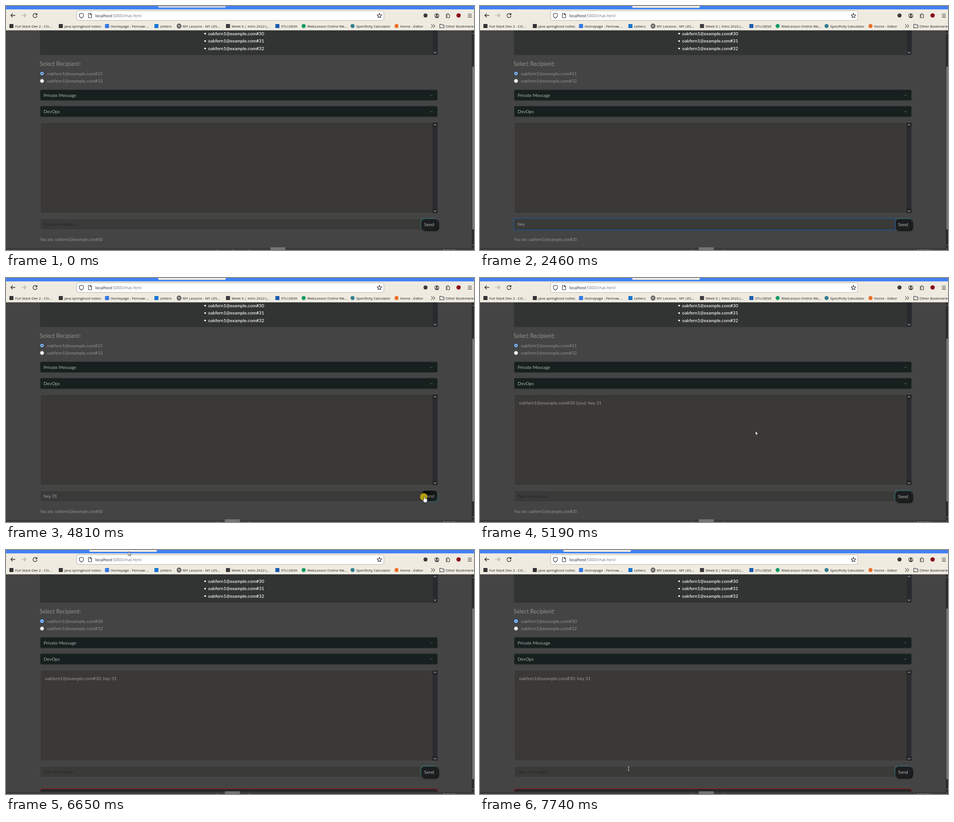
Write an HTML page that moves like this. It is 1033 px wide and 542 px high and loops after 8 s.

```html
<!DOCTYPE html>
<html lang="en">
<head>
<meta charset="utf-8">
<title>Chat demo</title>
<style>
  html, body { margin: 0; width: 100%; height: 100%; overflow: hidden; background: #444; }
  svg { display: block; width: 100vw; height: 100vh; }
  text { white-space: pre; }
  .ui { font: 7.9px "Open Sans", "Noto Sans", sans-serif; fill: #1c1b20; }
  .url { font-size: 8.85px; }
  .page { font: 10.05px Lato, "Open Sans", sans-serif; fill: #909090; }
  .line { fill: none; stroke: #2c2b30; stroke-width: 1.1; stroke-linecap: round; stroke-linejoin: round; }
  .send { filter: drop-shadow(-1px -1px .8px #3a858c) drop-shadow(2px 2px 1.2px #080808); }
  .pressed { filter: drop-shadow(1px 1px .8px #23727a); }
</style>
</head>
<body>
<svg viewBox="0 0 1033 542" preserveAspectRatio="none">
  <defs>
    <linearGradient id="inset" x2="1" y2="1">
      <stop offset="0" stop-color="#060606"/>
      <stop offset=".5" stop-color="#151616"/>
      <stop offset="1" stop-color="#222626"/>
    </linearGradient>
  </defs>
  <rect width="1033" height="542" fill="#444"/>

  <g class="page">
    <g id="content">
      <path d="M75 30H953V105a4 4 0 0 1-4 4H79a4 4 0 0 1-4-4z" fill="#323433"/>
      <path d="M942 30H953V105a4 4 0 0 1-4 4H942z" fill="#282a2d"/>
      <g id="members"></g>
      <text x="74" y="132.5" font-size="12.6">Select Recipient:</text>
      <g id="recipients"></g>
      <g id="selects"></g>
      <rect x="75.5" y="258.5" width="877" height="202" rx="5" fill="#3a3937" stroke="#4d4d4d"/>
      <rect x="941.5" y="259" width="11" height="201" fill="#2b2c2f"/>
      <path d="M941.5 259h11v10h-11zM941.5 450h11v10h-11z" fill="#242528"/>
      <g id="chevrons"></g>
      <text id="message" x="86" y="281.3" fill="#999"></text>

      <rect x="75.5" y="472.5" width="850" height="24.5" rx="4" fill="#3a3a39" stroke="#4a4a4a"/>
      <g id="sendUp">
        <rect class="send" x="916.5" y="473" width="37" height="24.5" rx="7" fill="#1c1d1e"/>
        <text x="923" y="488.5" fill="#b4b4b4">Send</text>
      </g>
      <g id="sendDown">
        <rect class="pressed" x="919" y="472.5" width="33" height="23.5" rx="6" fill="url(#inset)"/>
        <text x="926" y="488" font-size="8.8" fill="#9a9a9a">Send</text>
      </g>
      <g id="focus">
        <rect x="74.5" y="471.5" width="842.5" height="26.5" rx="3.5" fill="none" stroke="#2a4d78" stroke-width="2"/>
        <rect x="75.5" y="472.5" width="840.5" height="24.5" rx="3" fill="#3a3a39" stroke="#2b4a70" stroke-width=".8"/>
      </g>
      <text id="draft" x="83" y="488.3"></text>
      <rect id="caret" y="479" width="1" height="12" fill="#a5a5a5"/>
      <text id="identity" x="75" y="521.5" font-size="8.66" fill="#929292"></text>
    </g>
    <path id="alert" d="M75 542V535a5 5 0 0 1 5-5H948a5 5 0 0 1 5 5V542" fill="#272727" stroke="#8f2529" stroke-width="1.3"/>
  </g>

  <rect x="1028" y="54" width="5" height="483" fill="#2c2c2e"/>
  <rect id="thumb" x="1029" width="4" fill="#747476"/>
  <path d="M1029.5 62l2-2 2 2M1029.5 530l2 2 2-2" fill="none" stroke="#999"/>

  <rect y="537" width="1033" height="5" fill="#393a3a"/>
  <rect id="task" y="536" width="33" height="6" fill="#747474"/>
  <path d="M464 541.5h4M499 541.5h4M535 541.5h4" stroke="#888" stroke-width=".8"/>
  <text class="ui" x="965" y="546" style="fill:#eee">7:22 PM</text>

  <rect width="1033" height="8" fill="#4081f4"/>
  <rect id="tab" y="-4" width="149" height="8" rx="2"/>
  <rect y="7.5" width="1033" height="46.5" fill="#f0ebe1"/>
  <path d="M0 53.7H1033" stroke="#cfcac1" stroke-width=".7"/>
  <rect x="156" y="10.5" width="678" height="21.5" rx="3" fill="#fff" stroke="#aaa6a0" stroke-width=".9"/>
  <text class="ui url" x="197" y="25">localhost<tspan fill="#77757a">:5000/chat.html</tspan></text>

  <g class="line">
    <path d="M20 21H10.5M14.5 17l-4 4 4 4" stroke-width="1.3"/>
    <path d="M34.5 21H44M40 17l4 4-4 4" stroke="#a19d98"/>
    <path d="M68 19a4.5 4.5 0 1 0 .4 3.5M68.5 16.5v3h-3" stroke-width="1.3"/>
    <path d="M166.5 16l4.5 1.5v3.5c0 3-2 4.7-4.5 6-2.5-1.3-4.5-3-4.5-6v-3.5z"/>
    <path d="M182 16.5h4.5l2.5 2.5v7h-7zM186.3 16.5v2.7h2.7"/>
    <path id="star"/>
    <circle cx="951" cy="21.5" r="4.6"/>
    <circle cx="951" cy="20" r="1.5" fill="#2c2b30"/>
    <path d="M948.5 24.3h5" stroke-width="2"/>
    <path d="M971.5 19h2.3v-1a1.3 1.3 0 0 1 2.6 0v1h2.6v7h-7.5v-2.3h1a1.3 1.3 0 0 0 0-2.6h-1z"/>
    <path d="M1020 18h7.5M1020 21.3h7.5M1020 24.6h7.5"/>
    <path d="M939 41l3 3.5-3 3.5M943.5 41l3 3.5-3 3.5"/>
    <path d="M957.5 40.5h3.5l1 1.5h4.5v6.5h-9z"/>
    <circle cx="382" cy="44.5" r="4.6"/>
    <ellipse cx="382" cy="44.5" rx="2" ry="4.6"/>
    <path d="M377.5 43h9M377.5 46h9" stroke-width=".8"/>
  </g>
  <circle cx="926" cy="21" r="4.5" fill="#39383c"/>
  <circle cx="999" cy="21" r="4.8" fill="#850d18"/>
  <g id="bookmarks" class="ui"></g>

  <circle id="click" cx="922" cy="486" r="8" fill="#c2b000" opacity=".9"/>
  <g id="cursor">
    <path id="arrow" d="M0 0v9l2.1-2 1.5 3.2 1.3-.6-1.5-3.1h2.8z" fill="#fff" stroke="#222" stroke-width=".8"/>
    <path id="beam" d="M-2-4H-.5L0-3.5.5-4H2M0-3.5V3.5M-2 4H-.5L0 3.5.5 4H2" fill="none" stroke="#ddd" stroke-width=".9"/>
    <path id="hand" d="M-1 0q0-1.2 1-1.2t1 1.2v3.5l4 1q1 .4 1 1.5l-.7 3.5-1 2.5h-5l-3.3-4q-.7-1 .3-1.4l1.7.8z" fill="#fff" stroke="#222" stroke-width=".7"/>
  </g>
</svg>

<script>
const LOOP = 8000;
const SHIFT = 8;
const $ = id => document.getElementById(id);
const user = n => `oakfern1@example.com#${n}`;
const chevron = (x, y, dir, color) =>
  `<path d="M${x - 2.7} ${y - dir * 1.3}l2.7 ${dir * 2.7} 2.7 ${-dir * 2.7}" fill="none" stroke="${color}" stroke-width="1.2"/>`;

function radio(y, color, checked, label) {
  const dot = checked ? `<circle cx="79.5" cy="${y}" r="2.1" fill="${color}"/>` : "";
  return `<circle cx="79.5" cy="${y}" r="3.9" fill="#fff" stroke="${color}" stroke-width="1.3"/>${dot}
    <text x="90.5" y="${y + 3.5}">${label}</text>`;
}

function selectBox(y, label) {
  return `<rect x="75.5" y="${y}" width="877" height="24" rx="3" fill="#17201e" stroke="#303a37"/>
    <text x="83" y="${y + 15.5}" fill="#a9b0ad">${label}</text>${chevron(939, y + 12, 1, "#47514e")}`;
}

function buildStatic() {
  $("members").innerHTML = [30, 31, 32].map((n, i) => {
    const y = 61 + i * 16.5;
    return `<circle cx="439.5" cy="${y + .3}" r="1.9" fill="#fff"/>
      <text x="446" y="${y + 3.5}" fill="#fff" font-weight="500">${user(n)}</text>`;
  }).join("");
  $("selects").innerHTML = selectBox(186, "Private Message") + selectBox(222.2, "DevOps");
  $("chevrons").innerHTML = [[51, -1], [103.5, 1], [264, -1], [455.5, 1]]
    .map(([y, dir]) => chevron(947, y, dir, "#a8a8a8")).join("");
  $("identity").textContent = `You are: ${user(30)}`;

  const star = Array.from({ length: 10 }, (_, i) => {
    const a = i * Math.PI / 5, r = i % 2 ? 2.5 : 5.5;
    return `${(824.3 + r * Math.sin(a)).toFixed(2)} ${(21.5 - r * Math.cos(a)).toFixed(2)}`;
  });
  $("star").setAttribute("d", `M${star.join("L")}z`);

  const bookmarks = [
    [20, "Full Stack Dev 2 - CO...", "#333", 0],
    [129, "Java springboot notes:", "#333", 0],
    [231, "Homepage - Fennow ...", "#3478e0", 0],
    [340, "Letters", "#1976d2", 0],
    [390, "MY Lessons - MY LES..."],
    [498, "Week 0 | Intro 2022 (...", "#3b3b3b", 0],
    [607, "STU-DESK", "#1c5fae", 0],
    [665, "WebLesson Online We...", "#129b68", 1],
    [773, "Specificity Calculator", "#317f8f", 1],
    [870, "Home - Editor", "#e8702a", 1],
    [970, "Other Bookmarks"]
  ];
  $("bookmarks").innerHTML = bookmarks.map(([x, label, color, round]) => {
    const icon = color ? `<rect x="${x - 12.5}" y="40" width="9" height="9" rx="${round ? 4.5 : 1}" fill="${color}"/>` : "";
    return `${icon}<text x="${x}" y="47.5">${label}</text>`;
  }).join("");
}

// [start, shape, x, y]
const pointer = [
  [0, ""], [1380, "beam", 720, 485], [2090, ""],
  [4050, "beam", 820, 493.5], [4420, "beam", 913, 491.5],
  [4810, "hand", 924, 486.5], [5190, "arrow", 608, 340],
  [5560, "arrow", 411, 225], [5910, "arrow", 342, 139],
  [6290, "arrow", 272, 8.5], [6650, "arrow", 270, 3.5],
  [7020, "arrow", 375, 364], [7380, "arrow", 367, 436],
  [7740, "beam", 328, 486]
];
// [start, text]
const drafts = [[0, ""], [2090, "hey"], [3700, "hey 31"], [5190, ""]];

const at = (track, t) => track.filter(step => step[0] <= t).pop();
const within = (t, from, to) => t >= from && t < to;
const show = (id, on) => $(id).setAttribute("display", on ? "inline" : "none");
const set = (id, attrs) => {
  for (const key in attrs) $(id).setAttribute(key, attrs[key]);
};

let recipientView;
function showRecipients(other) {
  if (recipientView === other) return;
  recipientView = other;
  const accent = other ? "#1468dc" : "#0b559f";
  $("recipients").innerHTML = radio(150, accent, true, user(other ? 30 : 31)) +
    radio(166.4, "#aaa", false, user(32));
}

function update(t) {
  const other = t >= 6650, started = t >= 1380;
  set("content", { transform: `translate(0 ${other ? SHIFT : 0})` });
  set("tab", { x: other ? 184 : 336, fill: started ? "#f0ebe1" : "#bccbe8" });
  set("task", { x: started ? 483 : 583.5 });
  set("thumb", { y: other ? 130 : 135, height: other ? 379 : 361 });
  showRecipients(other);
  show("identity", !other);
  show("alert", other);

  $("message").textContent = t < 5190 ? "" : user(30) + (other ? "" : " (you)") + ": hey 31";
  const draft = at(drafts, t)[1];
  $("draft").textContent = draft || "Type a message...";
  set("draft", { fill: draft ? "#a3a3a3" : "#272727", "font-size": draft ? 10 : 9.45 });
  show("caret", within(t, 2090, 2460) || within(t, 3700, 4420));
  set("caret", { x: t < 3700 ? 98 : 112 });

  const pressed = within(t, 4810, 5190);
  show("focus", within(t, 1380, 4810));
  show("sendUp", !pressed);
  show("sendDown", pressed);
  show("click", pressed);

  const [, shape, x = 0, y = 0] = at(pointer, t);
  for (const id of ["arrow", "beam", "hand"]) show(id, id === shape);
  set("cursor", { transform: `translate(${x} ${y})` });
}

buildStatic();
const start = performance.now();
function tick() {
  update((performance.now() - start) % LOOP);
  requestAnimationFrame(tick);
}
tick();
</script>
</body>
</html>
```
